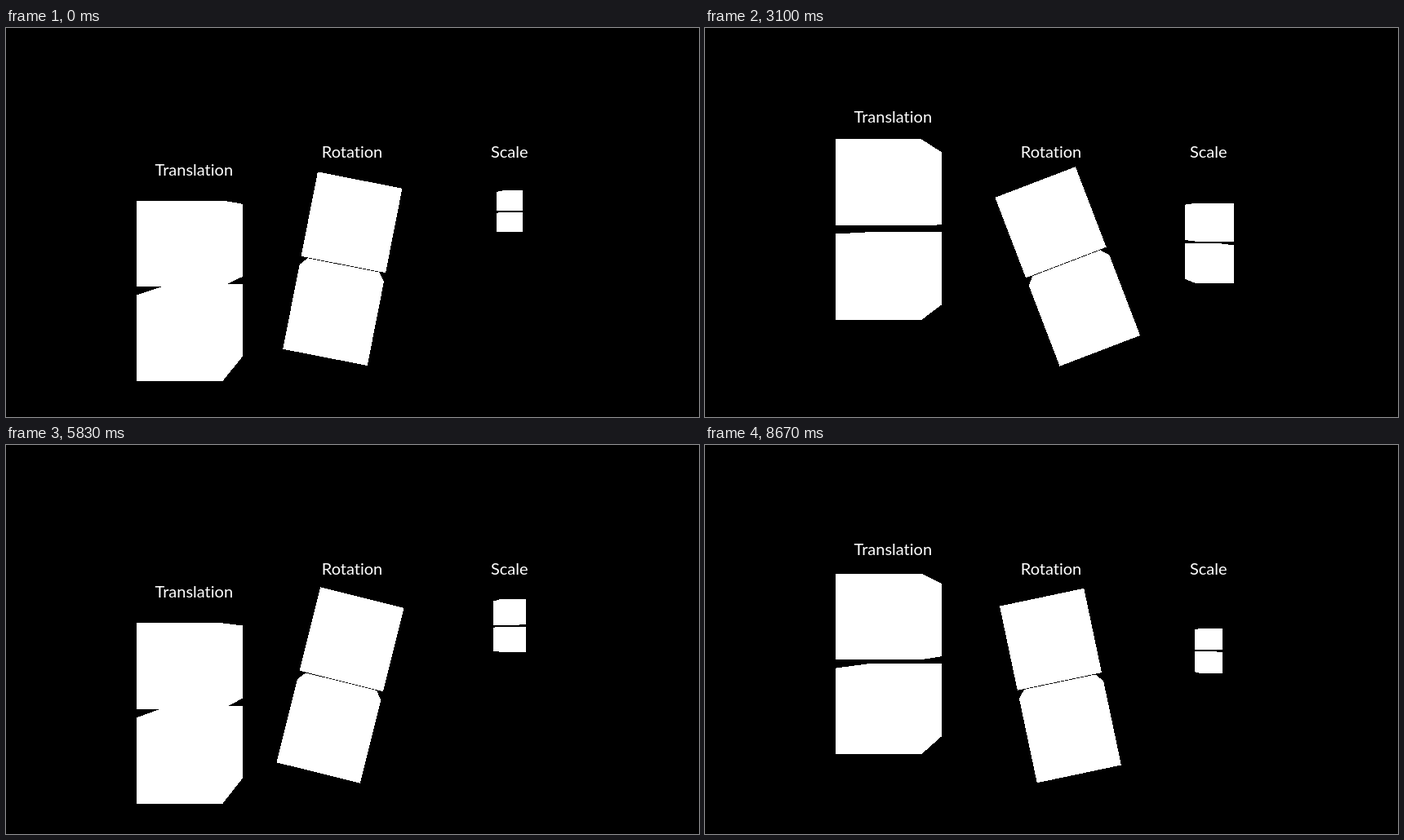
Write an HTML page that moves like this. It is 849 by 477 pixels and loops after 8.7 s.

```html
<!DOCTYPE html>
<html lang="en">
<head>
<meta charset="utf-8">
<title>Transforms</title>
<style>
  html, body { margin: 0; width: 100%; height: 100%; overflow: hidden; background: #000; }
  svg { display: block; width: 849px; height: 477px; }
  path { fill: #fff; shape-rendering: crispEdges; }
  text { fill: #fff; font: 20px Lato, sans-serif; font-variant-ligatures: none; text-anchor: middle; }
</style>
</head>
<body>
<svg viewBox="0 0 849 477">
  <path id="cubes"/>
  <text id="moving" x="230.3" y="159">Translation</text>
  <text x="424" y="159">Rotation</text>
  <text x="616.7" y="159">Scale</text>
</svg>
<script>
const LOOP = 8700;
const CENTER = { x: 423.5, y: 238.3 }, FOCAL = 580, DISTANCE = 6;
const COLUMN = 2, CHILD_OFFSET = 1.1, LABEL_Y = 159, LABEL_LAG = 0.02;
const cubes = document.getElementById('cubes');
const moving = document.getElementById('moving');

const wave = seconds => Math.sin(0.2483 + 1.0892 * seconds);

function project([x, y, z]) {
  const k = FOCAL / (DISTANCE + z);
  return [CENTER.x + x * k, CENTER.y + y * k];
}

// Convex outline by the monotone chain method.
function outline(points) {
  const sorted = [...points].sort((a, b) => a[0] - b[0] || a[1] - b[1]);
  const cross = (o, a, b) => (a[0] - o[0]) * (b[1] - o[1]) - (a[1] - o[1]) * (b[0] - o[0]);
  const chain = list => {
    const hull = [];
    for (const p of list) {
      while (hull.length > 1 && cross(hull.at(-2), hull.at(-1), p) <= 0) hull.pop();
      hull.push(p);
    }
    return hull.slice(0, -1);
  };
  return [...chain(sorted), ...chain(sorted.reverse())];
}

function cubePath(centerY, { x = 0, y = 0, angle = 0, scale = 1 }) {
  const cos = Math.cos(angle), sin = Math.sin(angle), corners = [];
  for (const i of [-0.5, 0.5]) for (const j of [-0.5, 0.5]) for (const k of [-0.5, 0.5]) {
    const u = i * scale, v = (centerY + j) * scale;
    corners.push(project([x + u * cos - v * sin, y + u * sin + v * cos, k * scale]));
  }
  return 'M' + outline(corners).map(p => p.map(n => n.toFixed(2))).join('L') + 'Z';
}

const pair = pose => cubePath(0, pose) + cubePath(CHILD_OFFSET, pose);

function draw(ms) {
  const seconds = (ms % LOOP) / 1000;
  const p = wave(seconds);
  cubes.setAttribute('d',
    pair({ x: -COLUMN, y: p }) +
    pair({ angle: p * Math.PI / 4 }) +
    pair({ x: COLUMN, scale: -p }));
  const shift = wave(seconds - LABEL_LAG) * FOCAL / DISTANCE;
  moving.setAttribute('y', (LABEL_Y + shift).toFixed(2));
}

const start = performance.now();
function tick() {
  draw(performance.now() - start);
  requestAnimationFrame(tick);
}
tick();
</script>
</body>
</html>
```
